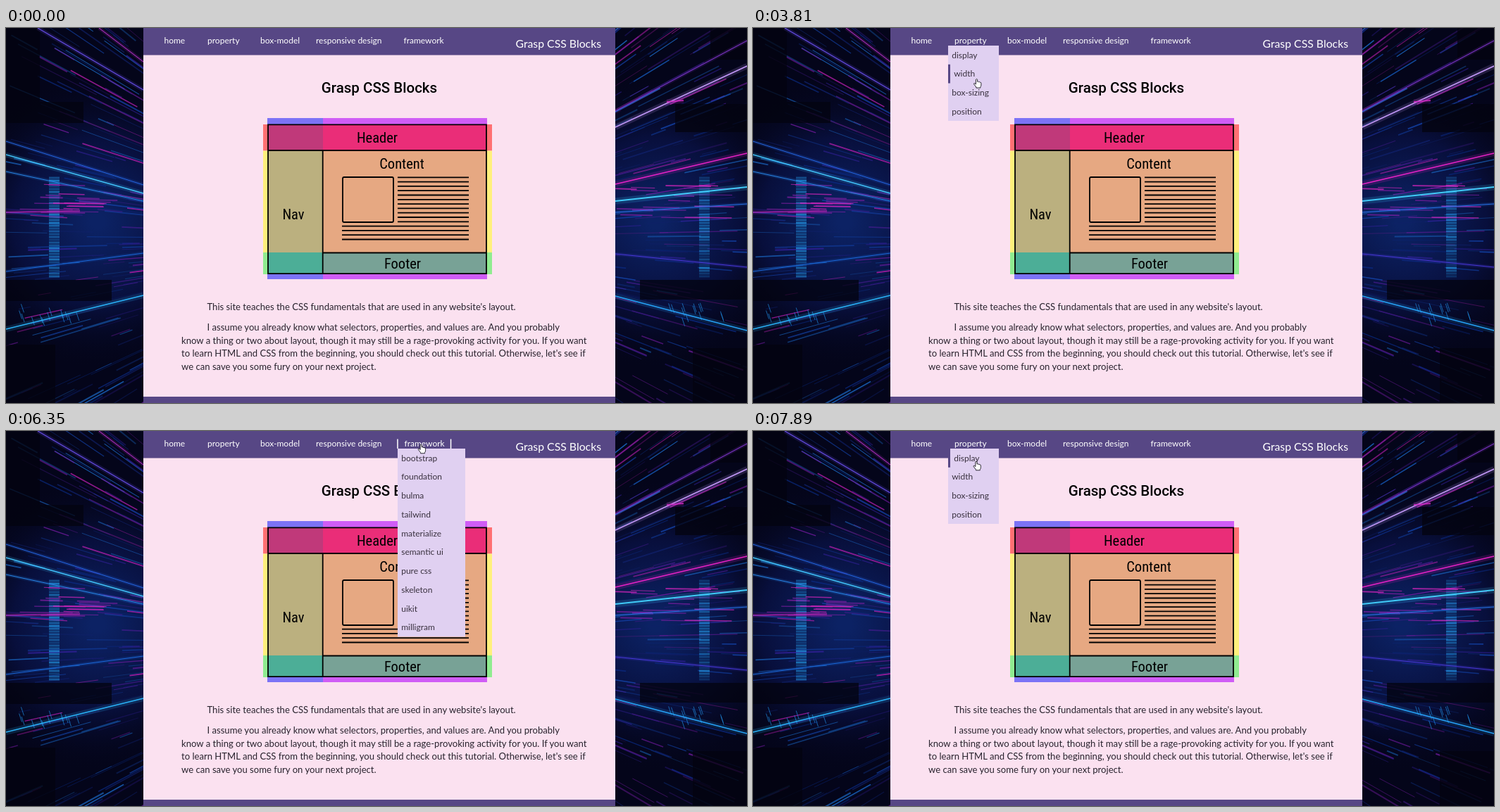
These frames come from a looping animation (1052x533 px, 8 s). An HTML page with a canvas:

```html
<!DOCTYPE html>
<html lang="en">
<head>
<meta charset="utf-8">
<title>Grasp CSS Blocks</title>
<style>
  html, body { margin: 0; width: 100%; height: 100%; overflow: hidden; background: #05061a; }
  canvas, svg { position: absolute; left: 0; top: 0; display: block; }
  text { font: 13.1px Lato, "Open Sans", sans-serif; fill: #29232e; white-space: pre; }
  .bar { fill: #574785; }
  .nav text, .menu text { font-size: 12px; }
  .nav text, .brand { fill: #fff; }
  .brand { font-size: 15.8px; text-anchor: end; }
  .title { font: 500 20.5px Roboto, sans-serif; fill: #000; text-anchor: middle; }
  .diagram text { font: 20.5px "Roboto Condensed", Roboto, sans-serif; fill: #000; text-anchor: middle; }
  .ink { fill: none; stroke: #000; stroke-width: 1.8; }
  .edge { fill: #fff; }
  .menu text { fill: #39313f; }
</style>
</head>
<body>
<canvas id="neon" width="1052" height="533"></canvas>
<svg id="stage" width="1052" height="533" viewBox="0 0 1052 533">
  <rect x="195" width="670" height="533" fill="#fbe1f0"/>
  <rect class="bar" x="195" width="670" height="38.5"/>
  <rect class="bar" x="195" y="524" width="670" height="9"/>
  <text class="brand" x="845" y="27.5">Grasp CSS Blocks</text>
  <text class="title" x="530" y="92">Grasp CSS Blocks</text>
  <g class="diagram">
    <g id="cells"></g>
    <path class="ink" d="M372 137.3H682V349.2H372ZM372 174H682M449.7 174V349M450 319.5H682"/>
    <rect class="ink" x="478" y="212" width="72" height="64" rx="2"/>
    <path class="ink" id="copy"/>
    <text x="527" y="163">Header</text>
    <text x="562" y="200">Content</text>
    <text x="408" y="272">Nav</text>
    <text x="563" y="342">Footer</text>
  </g>
  <text x="285.5" y="401">This site teaches the CSS fundamentals that are used in any website's layout.</text>
  <text x="285.5" y="430">I assume you already know what selectors, properties, and values are. And you probably</text>
  <text x="249" y="448.5">know a thing or two about layout, though it may still be a rage-provoking activity for you. If you want</text>
  <text x="249" y="467">to learn HTML and CSS from the beginning, you should check out this tutorial. Otherwise, let's see if</text>
  <text x="249" y="485.5">we can save you some fury on your next project.</text>
  <g id="nav" class="nav"></g>
  <g id="menus"></g>
  <g id="cursor" stroke="#16131c" stroke-width=".9" stroke-linejoin="round" fill="#fff">
    <path id="arrow" d="M0 0V9.6L2.2 7.6L3.8 11.2L5.4 10.5L3.8 7H6.8Z"/>
    <path id="hand" d="M-1.1 .9Q0-.6 1.1 .9V4Q2.3 3.2 3 4.4Q4.3 3.8 4.9 4.9Q6.4 4.6 6.4 6.3V8.6Q6.4 10.4 5.3 11.6V12.8H-.6V11.7L-3.8 7.6Q-4.3 6.1-2.8 6.2L-1.1 7.6Z"/>
  </g>
</svg>
<script>
const LOOP = 8000;
const $ = id => document.getElementById(id);

function add(parent, tag, attrs, label) {
  const el = document.createElementNS('http://www.w3.org/2000/svg', tag);
  for (const k in attrs) el.setAttribute(k, attrs[k]);
  if (label) el.textContent = label;
  parent.appendChild(el);
  return el;
}

// Neon tunnel behind the page
function drawNeon() {
  const c = $('neon').getContext('2d');
  let seed = 11;
  const rnd = () => (seed = seed * 16807 % 2147483647) / 2147483647;
  const line = (x1, y1, x2, y2, color, w, alpha) => {
    c.globalAlpha = alpha;
    c.strokeStyle = color;
    c.lineWidth = w;
    c.beginPath();
    c.moveTo(x1, y1);
    c.lineTo(x2, y2);
    c.stroke();
  };
  const glow = (x1, y1, x2, y2, color, w = 1.4) => {
    line(x1, y1, x2, y2, color, w * 5, .16);
    line(x1, y1, x2, y2, color, w, .95);
  };

  c.fillStyle = '#04051a';
  c.fillRect(0, 0, 1052, 533);
  for (const x of [130, 922]) {
    const g = c.createRadialGradient(x, 275, 10, x, 275, 210);
    g.addColorStop(0, '#0c2264');
    g.addColorStop(.55, '#080f3c');
    g.addColorStop(1, '#04051a00');
    c.fillStyle = g;
    c.fillRect(x - 210, 0, 420, 533);
  }

  const blues = ['#0b2c86', '#10216a', '#1446b0', '#1d74d8', '#33209a'];
  const pinks = ['#7a1ca8', '#c01fb4', '#4a1c94'];
  for (let i = 0; i < 380; i++) {
    const right = i % 2, y0 = -170 + rnd() * 870, slope = (300 - y0) / 530;
    const x1 = rnd() * 200 - 20, x2 = x1 + 15 + rnd() * 100;
    const set = rnd() < (right ? .3 : .2) ? pinks : blues;
    const put = x => right ? 1052 - x : x;
    line(put(x1), y0 + slope * x1, put(x2), y0 + slope * x2,
      set[rnd() * set.length | 0], .5 + rnd() * 1.6, .25 + rnd() * .55);
  }

  // dark panels
  c.globalAlpha = .75;
  c.fillStyle = '#03030f';
  for (const [x, y, w, h] of [[0, 0, 48, 105], [0, 105, 110, 30], [0, 358, 150, 30], [0, 450, 70, 83],
    [1000, 0, 52, 45], [950, 108, 102, 40], [900, 358, 152, 28], [975, 455, 77, 78]])
    c.fillRect(x, y, w, h);

  // light columns and flat dashes
  for (const x of [61, 984])
    for (let y = 213; y < 355; y += 4) line(x, y, x + 15, y, '#249be8', 3, .2 + rnd() * .5);
  for (let i = 0; i < 34; i++) {
    const x = i % 2 ? 865 + rnd() * 120 : rnd() * 110, y = 222 + rnd() * 48;
    line(x, y, x + 20 + rnd() * 60, y + 1, i % 3 ? '#8f1fae' : '#e326c4', 1 + rnd(), .65);
  }
  for (let i = 0; i < 26; i++) {
    const x = (i % 2 ? 935 : 15) + rnd() * 85, y = 390 + rnd() * 22;
    line(x, y, x + 4, y + 12, '#1e8be0', 1, .7);
  }

  glow(0, 180, 195, 235, '#43c9ff');
  glow(0, 161, 195, 223, '#256bea', 1);
  glow(45, 0, 195, 88, '#6a50ee', 1.2);
  glow(132, 0, 195, 48, '#c936d8', 1);
  glow(0, 204, 195, 246, '#2a8cf0', 1);
  glow(0, 262, 105, 260, '#d824c4', 1.2);
  glow(0, 346, 195, 320, '#1c6ce0', 1);
  glow(0, 428, 195, 380, '#2bb9ff', 1.6);
  glow(865, 141, 1052, 54, '#c99cff', 1.6);
  glow(865, 118, 1052, 18, '#8d3be0', 1);
  glow(865, 222, 1052, 178, '#f022cb', 1.6);
  glow(865, 246, 1052, 226, '#43d2ff', 1.8);
  glow(865, 262, 1052, 250, '#2a78f0', 1);
  glow(865, 321, 1052, 340, '#4b39e0', 1);
  glow(865, 381, 1052, 430, '#27a9ff', 1.5);
  glow(938, 105, 962, 103, '#d62ac8', 1.5);
  c.globalAlpha = 1;
}

// Layout diagram
for (const [x, y, w, h, fill] of [
  [371, 128, 79, 229, '#7c73f6'], [450, 128, 233, 229, '#d05df6'],
  [365, 137, 325, 37.5, '#ff7073'], [365, 174.5, 325, 144.5, '#fff07c'], [365, 319, 325, 31, '#90ec90'],
  [372, 137, 78, 37, '#c0397a'], [450, 137, 232, 37, '#ea2d78'],
  [372, 174, 78, 145, '#bbb07f'], [450, 174, 232, 145, '#e6a882'],
  [372, 319, 78, 30, '#4cae97'], [450, 319, 232, 30, '#78a296']
]) add($('cells'), 'rect', { x, y, width: w, height: h, fill });
let rows = '';
for (let i = 0; i < 15; i++) rows += `M${i < 11 ? 556 : 477} ${212.3 + i * 6.3}H657`;
$('copy').setAttribute('d', rows);

// Navigation: label, text x, text width
const links = [['home', 224.5, 30], ['property', 286, 44], ['box-model', 361, 57],
  ['responsive design', 440, 93], ['framework', 564.5, 56]].map(([name, x, w]) => {
  const g = add($('nav'), 'g', {});
  add(g, 'text', { x, y: 22.3 }, name);
  const edges = add(g, 'g', { class: 'edge' });
  for (const ex of [x - 10.3, x + w + 9.3])
    add(edges, 'rect', { x: ex, y: 11.5, width: 1.5, height: 13.5 });
  return { name, g, edges };
});

function makeMenu(owner, x, width, names) {
  const g = add($('menus'), 'g', { class: 'menu' }), step = 26.75;
  add(g, 'rect', { x, y: 25, width, height: step * names.length, fill: '#e0d0f1' });
  const items = names.map((name, i) => {
    const mark = add(g, 'rect', { class: 'bar', x, y: 25 + i * step, width: 3, height: step });
    const text = add(g, 'text', { x: x + 5.2, y: 42.5 + i * step }, name);
    return { name, mark, text };
  });
  return { owner, g, items };
}
const menus = [
  makeMenu('property', 277, 72, ['display', 'width', 'box-sizing', 'position']),
  makeMenu('framework', 556, 96, ['bootstrap', 'foundation', 'bulma', 'tailwind', 'materialize',
    'semantic ui', 'pure css', 'skeleton', 'uikit', 'milligram'])
];

// Pointer path: time, x, y
const path = [
  [180, 995, 490], [950, 284, 46], [1020, 280, 44], [1220, 238, 20],
  [1880, 238, 20], [2050, 262, 30], [2310, 321, 25.3], [2510, 317, 19],
  [3110, 317, 19], [3450, 319, 48], [3810, 317.5, 72.3],
  [4080, 317.5, 72.3], [4330, 326, 112], [4700, 336, 92], [4770, 342, 69.5], [4840, 352.5, 45],
  [4900, 353, 44], [5170, 385, 19],
  [5370, 385, 19], [5860, 538, 19], [6150, 590, 19],
  [6350, 590, 19], [6600, 400, 20], [6680, 322, 20], [7030, 240, 19],
  [7290, 240, 19], [7480, 300, 20], [7890, 317, 43]
];

// What is hovered from each time on
const hovers = [
  [0, ''], [1150, 'home'], [1960, ''], [2380, 'property'], [3250, 'display'], [3600, 'width'],
  [4180, 'box-sizing'], [4330, 'position'], [4560, 'box-sizing'], [4840, ''],
  [5030, 'box-model'], [5570, 'responsive design'], [5950, ''], [6020, 'framework'],
  [6430, 'responsive design'], [6590, 'box-model'], [6750, 'property'], [6890, ''], [6960, 'home'],
  [7360, ''], [7430, 'property'], [7650, 'display']
];

const show = (el, on) => el.setAttribute('visibility', on ? 'inherit' : 'hidden');
const hoverAt = t => hovers.filter(h => h[0] <= t).pop()[1];

function pointAt(t) {
  const i = path.findIndex(p => p[0] > t);
  if (i < 0) return path[path.length - 1].slice(1);
  if (i === 0) return path[0].slice(1);
  const [t0, x0, y0] = path[i - 1], [t1, x1, y1] = path[i];
  const k = (t - t0) / (t1 - t0);
  return [x0 + (x1 - x0) * k, y0 + (y1 - y0) * k];
}

function render(t) {
  const hover = hoverAt(t);
  const active = links.findIndex(l => l.name === hover);
  links.forEach((l, i) => {
    const shift = active < 0 || i < active ? 0 : i === active ? 1 : 2;
    l.g.setAttribute('transform', `translate(${shift} 0)`);
    show(l.edges, i === active);
  });
  for (const m of menus) {
    show(m.g, m.owner === hover || m.items.some(it => it.name === hover));
    for (const it of m.items) {
      const on = it.name === hover;
      it.mark.setAttribute('opacity', on ? 1 : 0);
      it.text.setAttribute('transform', `translate(${on ? 3 : 0} 0)`);
    }
  }
  // the hover style follows the pointer slightly late
  const hand = hoverAt(Math.min(t + 60, LOOP - 1)) !== '';
  const [x, y] = pointAt(t);
  $('cursor').setAttribute('transform', `translate(${x.toFixed(1)} ${y.toFixed(1)})`);
  show($('cursor'), t >= 180);
  show($('hand'), hand);
  show($('arrow'), !hand);
}

drawNeon();
const start = performance.now();
function tick() {
  render((performance.now() - start) % LOOP);
  requestAnimationFrame(tick);
}
tick();
</script>
</body>
</html>
```
